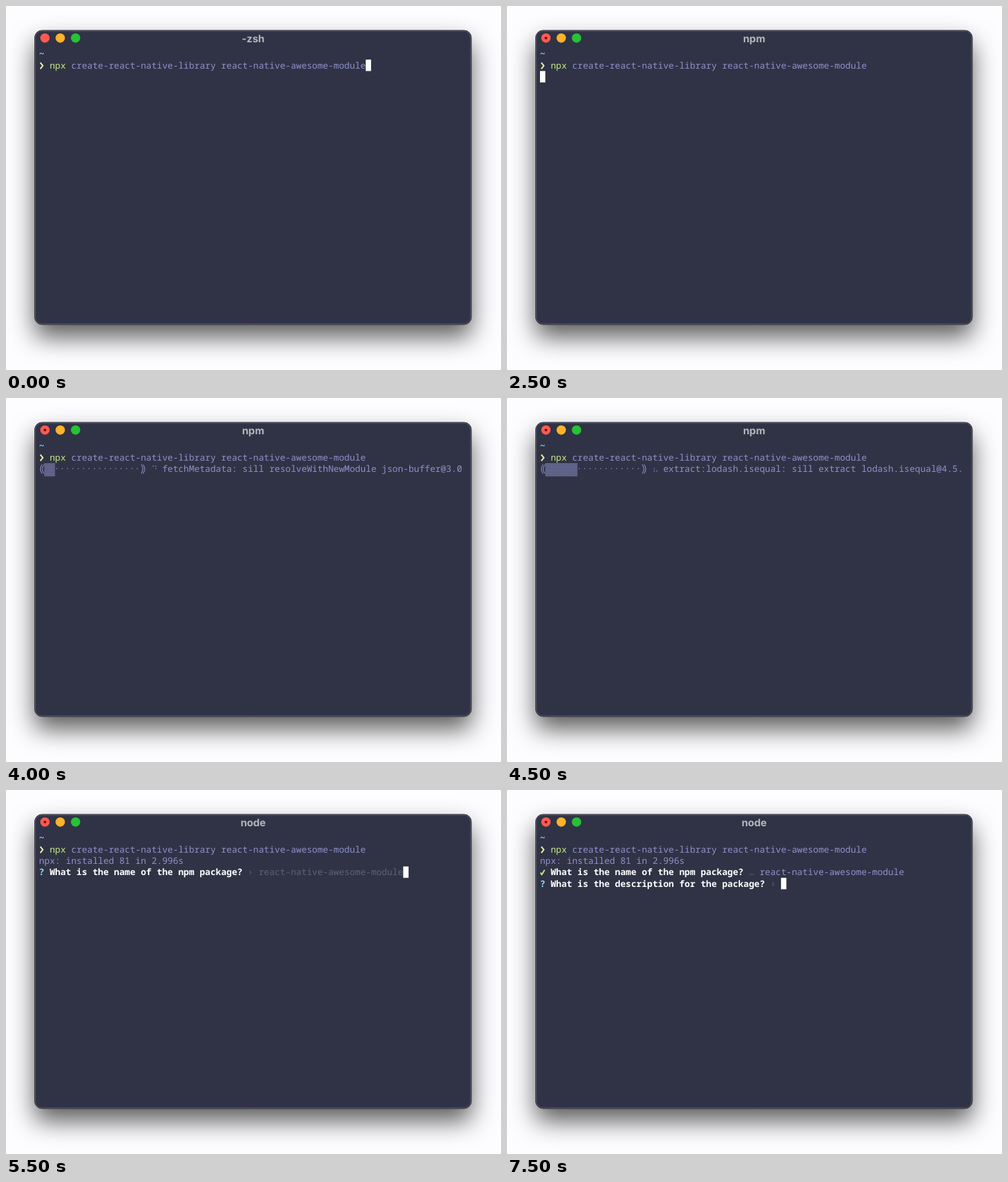
Write an HTML page with a canvas that moves like this. It is 750 px wide and 552 px high and loops after 8000 ms.

```html
<!DOCTYPE html>
<html lang="en">
<head>
<meta charset="utf-8">
<title>Terminal</title>
<style>
  html, body { margin: 0; width: 100%; height: 100%; overflow: hidden; background: #fdfcfe; }
  canvas { display: block; width: 750px; height: 552px; }
</style>
</head>
<body>
<canvas id="stage" width="750" height="552"></canvas>
<script>
const ctx = document.getElementById('stage').getContext('2d');
const LOOP = 8000;
const CELL = { x: 50, y: 64, w: 8.115, h: 17.3 };
const FONT = '13.525px "Noto Sans Mono", "DejaVu Sans Mono", monospace';
const COLOR = {
  page: '#fdfcfe', window: '#303345', title: '#b5b6be', text: '#8f91cb',
  green: '#c5ec88', cyan: '#87dcf8', yellow: '#f1f8a6', white: '#ffffff', dim: '#5f6273'
};
const MODULE = 'react-native-awesome-module';

const colX = col => CELL.x + col * CELL.w;
const rowY = row => CELL.y + row * CELL.h;

function disc(x, y, r, color) {
  ctx.fillStyle = color;
  ctx.beginPath();
  ctx.arc(x, y, r, 0, Math.PI * 2);
  ctx.fill();
}

function polyline(points, color, width) {
  ctx.strokeStyle = color;
  ctx.lineWidth = width;
  ctx.beginPath();
  points.forEach(([x, y]) => ctx.lineTo(x, y));
  ctx.stroke();
}

// Places every character in its terminal cell.
function print(row, col, text, color, bold = false) {
  ctx.font = (bold ? 'bold ' : '') + FONT;
  ctx.textAlign = 'left';
  ctx.fillStyle = color;
  [...text].forEach((ch, i) => ctx.fillText(ch, colX(col + i), rowY(row) + 13.4));
}

function cursor(row, col) {
  ctx.fillStyle = COLOR.white;
  ctx.fillRect(colX(col), rowY(row), CELL.w, CELL.h);
}

function roundRect(inset) {
  ctx.beginPath();
  ctx.roundRect(43.5 + inset, 37 + inset, 661.5 - 2 * inset, 446 - 2 * inset, 11 - inset);
}

function drawWindow(title, busy) {
  ctx.fillStyle = COLOR.page;
  ctx.fillRect(0, 0, 750, 552);

  ctx.save();
  ctx.shadowColor = 'rgba(0, 0, 0, 0.64)';
  ctx.shadowBlur = 37;
  ctx.shadowOffsetY = 19;
  ctx.fillStyle = COLOR.window;
  roundRect(0);
  ctx.fill();
  ctx.restore();

  ctx.lineWidth = 1;
  ctx.strokeStyle = '#24252f';
  roundRect(0);
  ctx.stroke();
  ctx.strokeStyle = '#5d5f6c';
  roundRect(1);
  ctx.stroke();

  ['#ff5a52', '#fdb32b', '#26c236'].forEach((c, i) => disc(59 + i * 23.2, 48.6, 7.1, c));
  if (busy) disc(59, 48.6, 2.1, '#7c0d0d');

  ctx.font = 'bold 15.5px Inter, "Open Sans", sans-serif';
  ctx.textAlign = 'center';
  ctx.fillStyle = COLOR.title;
  ctx.fillText(title, 374.5, 54.6);
}

function drawPrompt() {
  print(0, 0, '~', COLOR.cyan, true);
  polyline([[52, 85.8], [55.8, 90.6], [52, 95.4]], COLOR.yellow, 2);
  print(1, 2, 'npx', COLOR.green);
  print(1, 6, 'create-react-native-library ' + MODULE, COLOR.text);
}

// Dots 1-6 of a braille pattern, column by column.
function braille(row, col, ch) {
  const bits = ch.codePointAt(0) - 0x2800;
  for (let i = 0; i < 6; i++) {
    if (bits >> i & 1) {
      disc(colX(col) + 2.7 + Math.floor(i / 3) * 3.9, rowY(row) + 4.8 + (i % 3) * 3.6, 0.85, COLOR.text);
    }
  }
}

function doubleParen(col, dir) {
  const mid = colX(col) + CELL.w / 2, top = rowY(2) + 2.2;
  ctx.strokeStyle = COLOR.text;
  ctx.lineWidth = 1.1;
  for (const shift of [-1.4, 1.4]) {
    const x = mid + shift;
    ctx.beginPath();
    ctx.moveTo(x + dir * 2, top);
    ctx.quadraticCurveTo(x - dir * 3, top + 7, x + dir * 2, top + 14);
    ctx.stroke();
  }
}

function shade(col, count) {
  const x0 = colX(col), y0 = rowY(2) + 0.4, w = count * CELL.w, h = 20;
  ctx.save();
  ctx.fillStyle = COLOR.text;
  ctx.globalAlpha = 0.3;
  ctx.fillRect(x0, y0, w, h);
  ctx.globalAlpha = 0.4;
  for (let y = 0; y < h; y += 2.5) ctx.fillRect(x0, y0 + y, w, 1);
  for (let x = 0; x < w; x += CELL.w / 4) ctx.fillRect(x0 + x, y0, 0.8, h);
  ctx.restore();
}

function progress(filled, spinner, message) {
  doubleParen(0, 1);
  shade(1, filled);
  for (let col = 1 + filled; col <= 18; col++) braille(2, col, '⠂');
  doubleParen(19, -1);
  braille(2, 21, spinner);
  print(2, 23, message.slice(0, 56), COLOR.text);
}

const resolving = name => 'fetchMetadata: sill resolveWithNewModule ' + name;

function question(row, text, mark, markColor = COLOR.dim) {
  print(row, 2, text, COLOR.white, true);
  print(row, text.length + 3, mark, markColor);
}

function installed() {
  print(2, 0, 'npx: installed 81 in 2.996s', COLOR.text);
}

function askName(cursorOn) {
  installed();
  print(3, 0, '?', COLOR.cyan, true);
  question(3, 'What is the name of the npm package?', '›');
  print(3, 41, MODULE, COLOR.dim);
  if (cursorOn) cursor(3, 68);
}

function askDescription() {
  installed();
  polyline([[50.8, 125.4], [52.8, 128.2], [57, 121.2]], COLOR.green, 2);
  question(3, 'What is the name of the npm package?', '…');
  print(3, 41, MODULE, COLOR.text);
  print(4, 0, '?', COLOR.cyan, true);
  question(4, 'What is the description for the package?', '›');
  cursor(4, 45);
}

const steps = [
  [0, () => cursor(1, 61)],
  [500, () => {}],
  [1000, () => cursor(1, 61)],
  [2000, () => cursor(2, 0)],
  [3000, () => progress(0, '⠹', resolving('has-flag@4.0.0'))],
  [3500, () => progress(1, '⠴', resolving('get-stream@5.1.0'))],
  [4000, () => progress(2, '⠙', resolving('json-buffer@3.0.0'))],
  [4500, () => progress(6, '⠦', 'extract:lodash.isequal: sill extract lodash.isequal@4.5.0')],
  [5000, () => askName(true)],
  [6000, () => askName(false)],
  [6500, () => askName(true)],
  [7000, askDescription]
];

function render(now) {
  const t = now % LOOP;
  const title = t < 2500 ? '-zsh' : t < 5500 ? 'npm' : 'node';
  drawWindow(title, t >= 2500);
  drawPrompt();
  steps.findLast(([start]) => t >= start)[1]();
}

ctx.textRendering = 'geometricPrecision';
ctx.lineJoin = 'miter';
const origin = performance.now();
function frame() {
  render(performance.now() - origin);
  requestAnimationFrame(frame);
}
frame();
</script>
</body>
</html>
```
